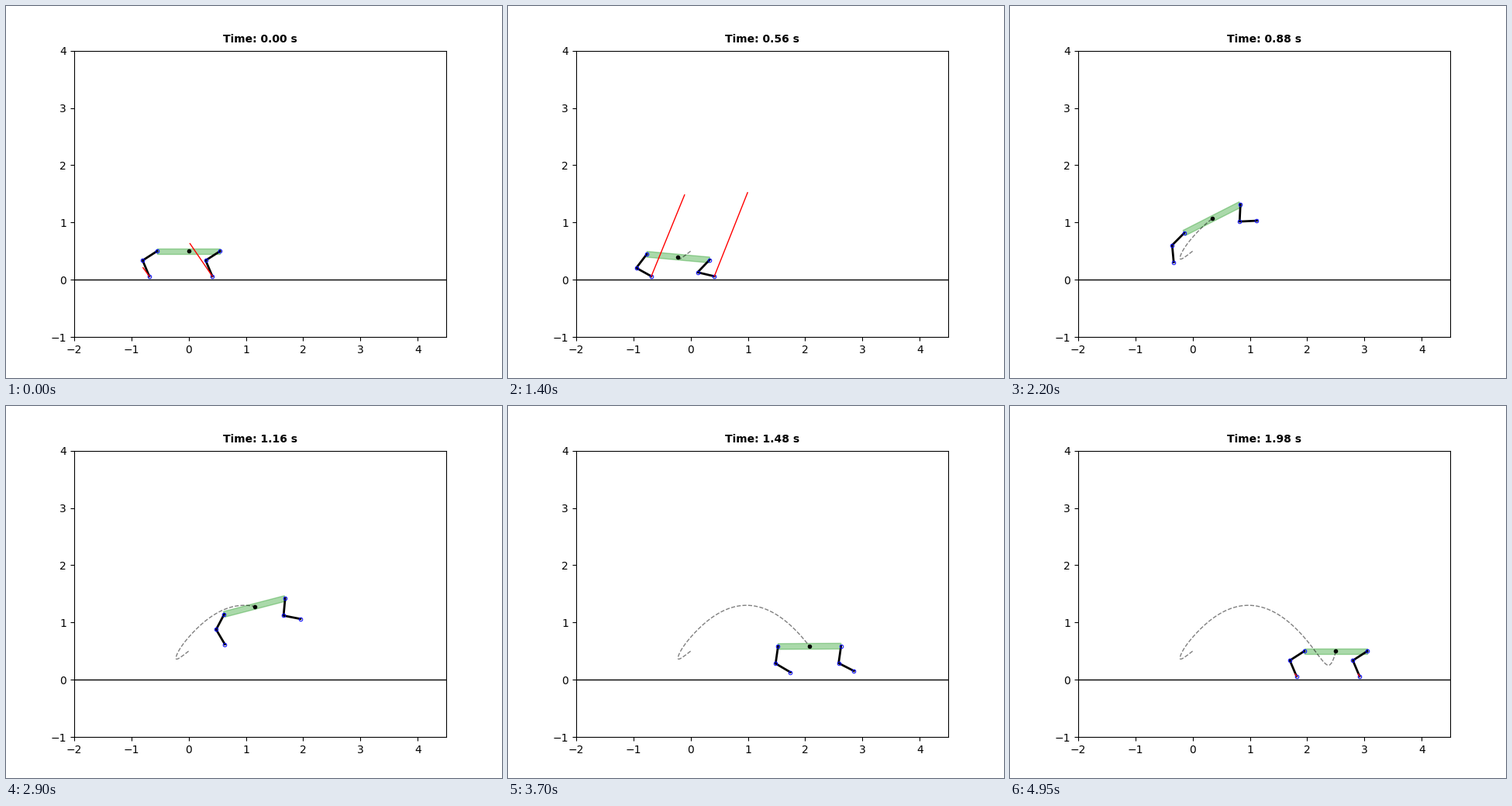
Write a matplotlib script that moves like this. It is 640 px wide and 480 px high and loops after 5000 ms.

```python
import numpy as np
import matplotlib.pyplot as plt
from matplotlib.animation import FuncAnimation
from matplotlib.patches import Polygon

FRAMES, STEP = 100, 0.02
HALF, THICK, LINK = 0.55, 0.05, 0.3
GRAVITY, APEX = 9.81, 1.098
FRONT_LIFT, TAKEOFF, FRONT_SET, LANDING, END = 0.66, 0.78, 0.80, 1.50, 1.98
REAR, FRONT = LEGS = (0, 1)
SIDE = (-1, 1)
JUMP = np.array((2.5, 0, 0))
REST = np.array((0, 0.5, 0))
STILL = np.zeros(3)


def flight(t):
    """Ballistic body pose (x, y, pitch) and its rate."""
    s = t - APEX
    pose = np.array((0.974 + 2.885 * s, 1.3 - GRAVITY / 2 * s**2, 0.302 - 0.775 * s))
    return pose, np.array((2.885, -GRAVITY * s, -0.775))


# key poses: time, pose, rate
CROUCH = [
    (0, REST, STILL),
    (0.34, np.array((-0.157, 0.383, -0.086)), np.array((-0.5, -0.32, -0.1))),
    (0.56, np.array((-0.218, 0.396, -0.09)), np.array((0.15, 0.7, 0.4))),
    (TAKEOFF, *flight(TAKEOFF)),
]
SETTLE = [
    (LANDING, *flight(LANDING)),
    (1.66, np.array((2.372, 0.254, 0)), np.array((0.7, 0, 0))),
    (END, REST + JUMP, STILL),
]


def hermite(keys, t):
    for (t0, p0, v0), (t1, p1, v1) in zip(keys, keys[1:]):
        if t <= t1:
            break
    T = t1 - t0
    u = min((t - t0) / T, 1)
    return (p0 + (p1 - p0) * ease(u)
            + T * v0 * u * (1 - u)**2 + T * v1 * u * u * (u - 1))


def ease(u):
    return u * u * (3 - 2 * u)


def body(t):
    if t <= TAKEOFF:
        return hermite(CROUCH, t)
    if t < LANDING:
        return flight(t)[0]
    return hermite(SETTLE, t)


def on_body(pose, u, v):
    x, y, th = pose
    c, s = np.cos(th), np.sin(th)
    return np.array((x + u * c - v * s, y + u * s + v * c))


def leg_points(leg, pose, thigh, bend):
    """Hip, knee and foot for joint angles relative to the body."""
    back = thigh - pose[2]
    ahead = bend - back
    hip = on_body(pose, SIDE[leg] * HALF, 0)
    knee = hip - LINK * np.array((np.sin(back), np.cos(back)))
    foot = knee + LINK * np.array((np.sin(ahead), -np.cos(ahead)))
    return np.array((hip, knee, foot))


def foothold(leg, t):
    foot = leg_points(leg, REST, 1.0, 1.4)[2]
    return foot if t < LANDING else foot + JUMP[:2]


def reach(leg, t):
    """Joint angles that keep the foot on its foothold."""
    pose = body(t)
    dx, dy = foothold(leg, t) - on_body(pose, SIDE[leg] * HALF, 0)
    half = np.arccos(min(np.hypot(dx, dy) / (2 * LINK), 1))
    return np.array((np.arctan2(-dx, -dy) + half + pose[2], 2 * half))


def swing(leg, t):
    """Joint angles in the air, turning at steady rates to the landing pose."""
    left = LANDING - t
    if leg == REAR:
        return np.array((0.11 + 1.847 * left, 1.19 - 0.508 * left))
    return np.array((0.135 + 0.62 * left, 1.227 + 0.71 * left))


def grounded(leg, t):
    return t <= (TAKEOFF, FRONT_LIFT)[leg] or t >= LANDING


def joint_angles(leg, t):
    if grounded(leg, t):
        return reach(leg, t)
    angles = swing(leg, t)
    if leg == FRONT and t < FRONT_SET:
        lifted = reach(leg, FRONT_LIFT)
        u = (t - FRONT_LIFT) / (FRONT_SET - FRONT_LIFT)
        angles = lifted + (angles - lifted) * ease(u)
    return angles


# each leg's push is a parabola in time through three forces
PUSH_TIMES = (0, 0.34, 0.56)
PUSH = [np.polyfit(PUSH_TIMES, forces, 2) for forces in (
    [(-0.11, 0.15), (0.08, 0.73), (0.58, 1.42)],
    [(-0.39, 0.57), (0.08, 0.61), (0.58, 1.46)],
)]
BRAKE = np.array((-1.5, 2.4))


def ground_force(leg, t):
    if t < LANDING:
        return np.array((t * t, t, 1)) @ PUSH[leg]
    return BRAKE * (1 - (t - LANDING) / 0.55)**2


fig, ax = plt.subplots(figsize=(6.4, 4.8), dpi=100)
ax.set_aspect('equal')
ax.set_xlim(-2, 4.5)
ax.set_ylim(-1, 4)
clock = ax.text(0.5, 1.02, '', transform=ax.transAxes, fontsize=10,
                fontweight='bold', ha='center', va='bottom')

ax.plot([-2, 4.5], [0, 0], 'k-', lw=1)
trunk = ax.add_patch(Polygon(np.zeros((4, 2)), color='tab:green', alpha=0.4))
trail, = ax.plot([], [], 'k--', lw=1, alpha=0.5)
limbs = [ax.plot([], [], 'k-', lw=2)[0] for _ in LEGS]
joints, = ax.plot([], [], 'bo', ms=3.3, mew=0.7, fillstyle='none')
forces = [ax.plot([], [], 'r-', lw=1)[0] for _ in LEGS]
center, = ax.plot([], [], 'ko', ms=3)

path = np.array([body(i * STEP / 2)[:2] for i in range(2 * FRAMES)])


def draw(i):
    t = round(i * STEP, 4)
    pose = body(t)
    clock.set_text(f'Time: {t:.2f} s')
    corners = ((-1, -1), (1, -1), (1, 1), (-1, 1))
    trunk.set_xy([on_body(pose, HALF * a, THICK * b) for a, b in corners])
    trail.set_data(*path[:2 * i + 1].T)
    center.set_data([pose[0]], [pose[1]])

    points = [leg_points(leg, pose, *joint_angles(leg, t)) for leg in LEGS]
    joints.set_data(*np.vstack(points).T)
    for leg in LEGS:
        limbs[leg].set_data(*points[leg].T)
        foot = points[leg][2]
        forces[leg].set_visible(grounded(leg, t))
        forces[leg].set_data(*np.array((foot, foot + ground_force(leg, t))).T)
    return [clock, trunk, trail, joints, center, *limbs, *forces]


anim = FuncAnimation(fig, draw, frames=FRAMES, interval=50, repeat=True)
plt.show()
```
